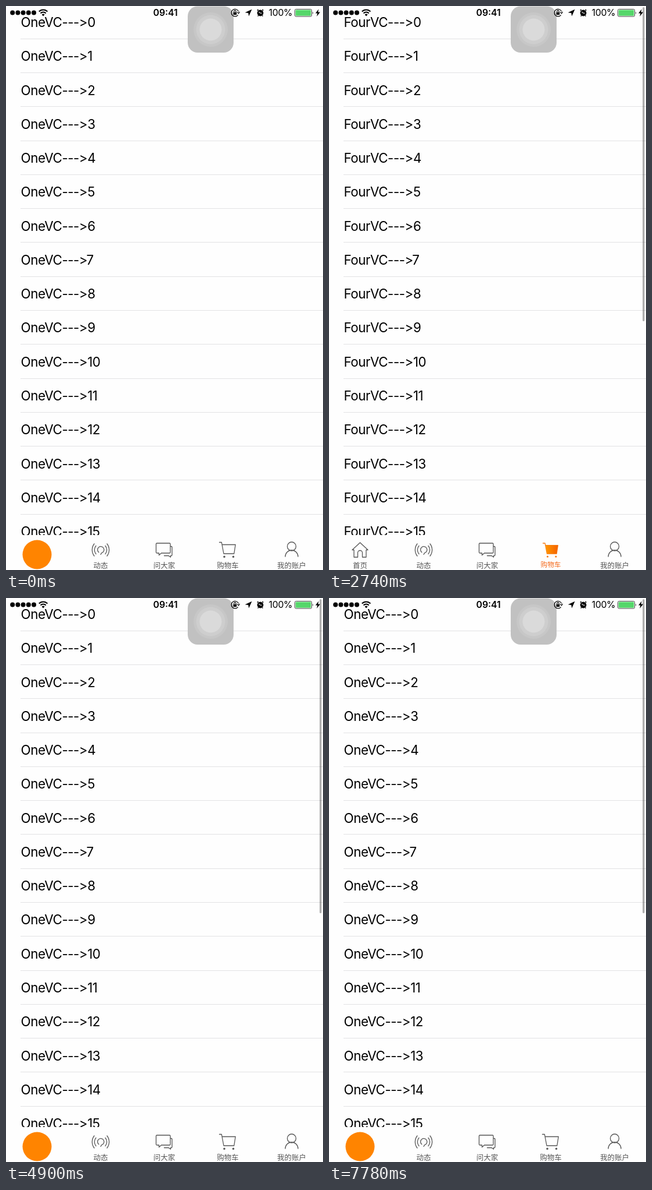
Write an HTML page that moves like this. It is 546 px wide and 968 px high and loops after 8 s.

```html
<!DOCTYPE html>
<html lang="zh">
<head>
<meta charset="utf-8">
<title>Tab bar bounce</title>
<style>
  html, body { margin: 0; width: 100%; height: 100%; overflow: hidden; background: #fefefe; }
  svg { display: block; width: 546px; height: 968px; }
  .row { font: 400 22.4px Inter, Roboto, sans-serif; letter-spacing: -.48px; font-variant-ligatures: none; font-feature-settings: "calt" 0; }
  .status { font: 400 15.8px Inter, Roboto, sans-serif; letter-spacing: -.25px; }
  .clock { font-weight: 600; letter-spacing: 0; }
  .label { font: 400 12.5px "Noto Sans CJK SC", "Noto Sans CJK", sans-serif; text-anchor: middle; fill: #555; }
  .on .label { fill: #f46a1c; }
  .line { fill: none; stroke: #555; stroke-width: 1.3; stroke-linecap: round; stroke-linejoin: round; }
  .hot { fill: none; stroke: #f57a14; stroke-width: 1.4; stroke-linecap: round; stroke-linejoin: round; }
  .fill { fill: url(#warm); stroke: none; }
</style>
</head>
<body>
<svg id="stage" viewBox="0 0 546 968">
  <defs>
    <linearGradient id="warm">
      <stop offset="0" stop-color="#ff9800"/>
      <stop offset="1" stop-color="#f56200"/>
    </linearGradient>
  </defs>
  <rect width="546" height="968" fill="#fefefe"/>
  <g id="list"></g>
  <rect id="scroll" x="540.2" y="2" width="3.2" height="539" rx="1.6" fill="#000"/>

  <!-- floating button -->
  <g>
    <rect x="313" y=".5" width="79" height="79.5" rx="17" fill="#bfbfbf" opacity=".96"/>
    <circle cx="352.5" cy="40.5" r="29.5" fill="#c7c7c7"/>
    <circle cx="352.5" cy="40.5" r="25" fill="#cecece"/>
    <circle cx="352.5" cy="40.5" r="19" fill="#dadada"/>
  </g>

  <!-- status bar -->
  <g id="dots"></g>
  <g fill="none" stroke="#000" stroke-width="2.1">
    <path d="M56.8 9.6a10.3 10.3 0 0 1 14.6 0M59.5 12.4a6.5 6.5 0 0 1 9.2 0"/>
    <path d="M61.6 14.8a3.6 3.6 0 0 1 5 0L64.1 17.4Z" fill="#000" stroke="none"/>
  </g>
  <text class="status clock" x="253.5" y="17.4">09:41</text>
  <g fill="none" stroke="#000" stroke-width="1.2">
    <path d="M400.4 9.5a6.3 6.3 0 1 0-.8 5.8M398.3 10.5l2.4 2.2 1.7-2.8"/>
    <rect x="391.6" y="10.8" width="5.6" height="4.4" fill="#000" stroke="none"/>
    <path d="M392.7 11V9.3a1.7 1.7 0 0 1 3.4 0V11"/>
  </g>
  <path d="M423.5 5.8L411.6 11.2L417.3 12L418.2 17.6Z"/>
  <circle cx="438" cy="12" r="5.4"/>
  <path d="M432.8 7.6l1.8-1.6M443.2 7.6l-1.8-1.6M434.6 16.4l-.8 1.2M441.4 16.4l.8 1.2" stroke="#000" stroke-width="1.6"/>
  <path d="M435.4 9.8l2.6 2.5h2.8" fill="none" stroke="#fff" stroke-width="1.1"/>
  <text class="status" x="452.5" y="17.4">100%</text>
  <rect x="497.5" y="5.5" width="29" height="12.5" rx="2" fill="#fff" stroke="#444" stroke-width="1"/>
  <rect x="498.8" y="6.8" width="26.4" height="9.9" rx="1" fill="#55d76a"/>
  <path d="M528 9.5q1.7 2.2 0 4.5Z"/>
  <path d="M538.6 5.2L533 12.4H536.4L535.2 18L541 10.6H537.4Z"/>

  <rect y="908" width="546" height="60" fill="#fefefe"/>
  <g id="tabs"></g>
</svg>
<script>
const LOOP = 8000, PIVOT = 941.5;
const byId = id => document.getElementById(id);
const clamp = v => Math.min(1, Math.max(0, v));

const waves = 'M-8-15a10.5 10.5 0 0 0 0 14M8-15a10.5 10.5 0 0 1 0 14' +
  'M-11-18.5a17 17 0 0 0 0 21M11-18.5a17 17 0 0 1 0 21';
const ring = 'M-3.2-3.8a5.6 5.6 0 1 1 5 1l-1.8 2.6';
const bubble = 'M-12.5-19.5h21.5q1.5 0 1.5 1.5v14q0 1.5-1.5 1.5h-14l-4 3.6v-3.6h-3.5q-1.5 0-1.5-1.5v-14q0-1.5 1.5-1.5Z';
const echo = 'M11-14h1q1.5 0 1.5 1.5V.5q0 1.5-1.5 1.5h-1v2.6L7.5 2H0';
const cart = 'M-14.5-21h3.8L-7-1.5H10.8L13.2-17H-10';
const wheels = '<circle cx="-6" cy="3.8" r="1.7"/><circle cx="9.5" cy="3.8" r="1.7"/>';
const person = 'M-11 3.5a11 11 0 0 1 22 0';

const line = d => `<path class="line" d="${d}"/>`;
const hot = d => `<path class="hot" d="${d}"/>`;
const solid = d => `<path class="fill" d="${d}"/>`;
const head = cls => `<circle class="${cls}" cy="-14" r="7.5"/>`;

const tabs = [
  { name: 'One', x: 53.5, label: '首页',
    off: line('M-13.5-8L0-20.5L13.5-8H10.5V4.5H4V-3a4 4 0 0 0-8 0V4.5H-10.5V-8Z'),
    on: '<circle r="25" fill="#ff8400"/>', bare: true },
  { name: 'Two', x: 163, label: '动态',
    off: line(waves) + line(ring),
    on: hot(waves) + solid('M-3.5-1.9a7.2 7.2 0 1 1 6 .8L0 2Z') },
  { name: 'Three', x: 272.5, label: '问大家',
    off: line(bubble) + line(echo), on: solid(bubble) + hot(echo) },
  { name: 'Four', x: 382, label: '购物车',
    off: line(cart) + `<g fill="#555">${wheels}</g>`,
    on: hot(cart) + solid('M-10-17H13.2L10.8-1.5H-7Z') + `<g fill="#f57a14">${wheels}</g>` },
  { name: 'Five', x: 492, label: '我的账户',
    off: head('line') + line(person), on: head('fill') + solid(person + 'Z') }
];

// [time, tab index]
const taps = [[-3000, 0], [150, 1], [680, 2], [2240, 3], [3440, 4], [3940, 0], [5306, 1], [6775, 0]];

const PITCH = 58.27;
let rows = '';
for (let i = 0; i < 16; i++) {
  rows += `<text class="row" x="25.5" y="${Math.round(36.02 + PITCH * i)}"></text>`;
  if (i < 15) rows += `<rect x="25" y="${Math.round(55.85 + PITCH * i)}" width="521" height="1" fill="#e2e2e4"/>`;
}
byId('list').innerHTML = rows;
const texts = [...document.querySelectorAll('.row')];

byId('dots').innerHTML = [0, 1, 2, 3, 4]
  .map(i => `<circle cx="${11.2 + 9.2 * i}" cy="11.6" r="4"/>`).join('');

byId('tabs').innerHTML = tabs.map(t => {
  const label = `<text class="label" y="23.4">${t.label}</text>`;
  return `<g transform="translate(${t.x} ${PIVOT})"><g class="off">${t.off}${label}</g>` +
    `<g class="on">${t.on}${t.bare ? '' : label}</g></g>`;
}).join('');
const offs = [...document.querySelectorAll('.off')];
const ons = [...document.querySelectorAll('.on')];

let shown = -1;
function select(tab) {
  if (tab === shown) return;
  shown = tab;
  texts.forEach((el, i) => el.textContent = `${tabs[tab].name}VC--->${i}`);
  tabs.forEach((_, i) => {
    offs[i].style.display = i === tab ? 'none' : '';
    ons[i].style.display = i === tab ? '' : 'none';
  });
}

// Underdamped spring from almost nothing to full size.
function spring(ms) {
  if (ms > 950) return 1;
  return 1 - .95 * Math.exp(-.0052 * ms) * Math.cos(2 * Math.PI * ms / 250);
}

const scrollAlpha = ms => .33 * clamp((ms - 395) / 70) * (1 - clamp((ms - 1180) / 170));

function draw(now) {
  const t = now % LOOP;
  const [start, tab] = taps.filter(p => p[0] <= t).pop();
  const age = t - start;
  select(tab);
  ons[tab].setAttribute('transform', `scale(${spring(age).toFixed(4)})`);
  byId('scroll').setAttribute('opacity', scrollAlpha(age).toFixed(3));
}

const begin = performance.now();
function tick() {
  draw(performance.now() - begin);
  requestAnimationFrame(tick);
}
tick();
</script>
</body>
</html>
```
